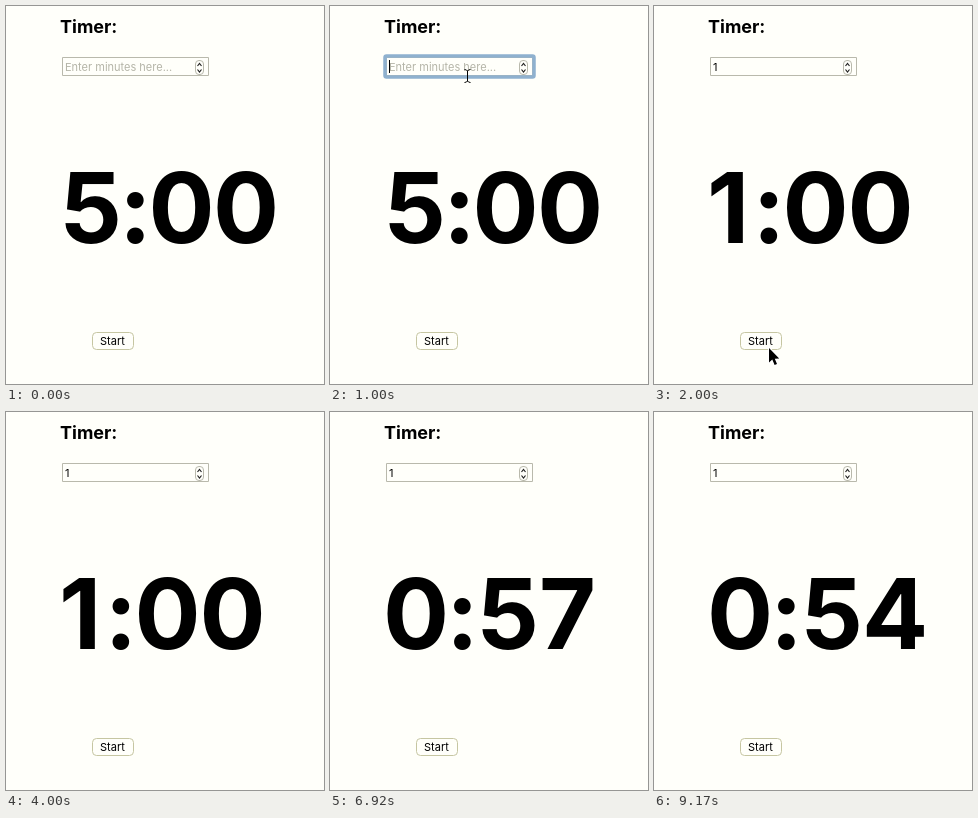
An HTML page with a canvas that plays this animation: 318x378 px, repeating every 9.21 s.

```html
<!DOCTYPE html>
<html lang="en">
<head>
<meta charset="utf-8">
<title>Timer</title>
<style>
  html, body { margin: 0; width: 100%; height: 100%; overflow: hidden; background: #fffffa; }
  canvas { display: block; width: 318px; height: 378px; }
</style>
</head>
<body>
<canvas></canvas>
<script>
const W = 318, H = 378, LOOP = 9210;
const TYPED = 1290, FOCUS = 880, BLUR = 1960, FIRST_TICK = 4040;
const FONT = 'Inter, "Open Sans", sans-serif';
const canvas = document.querySelector('canvas');
const ctx = canvas.getContext('2d');
const dpr = window.devicePixelRatio || 1;
canvas.width = W * dpr;
canvas.height = H * dpr;
ctx.scale(dpr, dpr);

// Pointer stops: time, x, y; equal neighbours are pauses.
const stops = [
  [40, 318, 378], [250, 232, 328], [420, 232, 328], [860, 137, 69],
  [1290, 137, 69], [1420, 170, 97], [1500, 172, 108], [1880, 115, 342],
  [2710, 115, 342], [2711, 119, 346], [2750, 119, 346]
];

function text(str, x, y, size, color = '#000', weight = 400) {
  ctx.font = `${weight} ${size}px ${FONT}`;
  ctx.fillStyle = color;
  ctx.fillText(str, x, y);
}

function box(x, y, w, h, r, color, width = 1) {
  ctx.beginPath();
  ctx.roundRect(x, y, w, h, r);
  ctx.strokeStyle = color;
  ctx.lineWidth = width;
  ctx.stroke();
}

function line(points, color = '#000', width = 1) {
  ctx.beginPath();
  points.forEach(([x, y]) => ctx.lineTo(x, y));
  ctx.strokeStyle = color;
  ctx.lineWidth = width;
  ctx.stroke();
}

function drawClock(t) {
  const ticks = Math.floor((t - FIRST_TICK) / 1000);
  let label = '5:00', lefts = [59, 121, 146.5, 211];
  if (ticks >= 0) {
    label = '0:' + (59 - ticks);
    lefts = [57, 124, 152, 212];
  } else if (t >= TYPED) {
    label = '1:00';
    lefts = [57, 106.5, 132.5, 197.5];
  }
  ctx.font = `700 98px ${FONT}`;
  [...label].forEach((c, i) => {
    const bearing = ctx.measureText(c).actualBoundingBoxLeft;
    text(c, lefts[i] + bearing, 237, 98, '#000', 700);
  });
}

function drawInput(t) {
  const focused = t >= FOCUS && t < BLUR;
  const typed = t >= TYPED;
  box(56.5, 51.5, 146, 18, 0, '#b9b9ac');
  if (focused) {
    ctx.globalAlpha = Math.min(1, (t - FOCUS) / 100);
    box(55, 50, 149, 21, 1.5, '#8fb1cf', 3.5);
    ctx.globalAlpha = 1;
  }
  if (typed) text('1', 59, 65, 11);
  else text('Enter minutes here...', 59, 65, 11, '#b5b5a8');
  if (focused) {
    const x = typed ? 64.5 : 59.5;
    line([[x, 54], [x, 67]]);
  }
  box(189.5, 54.5, 8, 14, 3.5, '#b9b9ac');
  line([[191.5, 60], [193.5, 57.5], [195.5, 60]], '#222', 1.2);
  line([[191.5, 63.5], [193.5, 66], [195.5, 63.5]], '#222', 1.2);
}

function drawArrow() {
  ctx.beginPath();
  [[0, 0], [0, 14.5], [3.3, 11.5], [5.6, 17], [8, 16], [5.8, 10.7], [10.2, 10.5]]
    .forEach(([x, y]) => ctx.lineTo(x, y));
  ctx.closePath();
  ctx.lineJoin = 'round';
  ctx.strokeStyle = '#fff';
  ctx.lineWidth = 2;
  ctx.stroke();
  ctx.fillStyle = '#000';
  ctx.fill();
  ctx.lineJoin = 'miter';
}

function drawBeam() {
  line([[-2.5, -5.5], [-0.5, -5], [0.5, -4], [0.5, 6], [-0.5, 7], [-2.5, 7.5]]);
  line([[3.5, -5.5], [1.5, -5], [0.5, -4], [0.5, 6], [1.5, 7], [3.5, 7.5]]);
}

function drawPointer(t) {
  const i = stops.findIndex(s => s[0] > t);
  if (i < 1) return;
  const [t0, x0, y0] = stops[i - 1], [t1, x1, y1] = stops[i];
  const p = (t - t0) / (t1 - t0), k = p * p * (3 - 2 * p);
  const x = x0 + (x1 - x0) * k, y = y0 + (y1 - y0) * k;
  const overInput = x > 56 && x < 203 && y > 51 && y < 70;
  ctx.save();
  ctx.translate(x, y);
  overInput ? drawBeam() : drawArrow();
  ctx.restore();
}

function draw(t) {
  ctx.fillStyle = '#fffffa';
  ctx.fillRect(0, 0, W, H);
  text('Timer:', 54, 27, 18, '#000', 700);
  drawInput(t);
  drawClock(t);
  box(86.5, 326.5, 41, 17, 4, '#c6c6a2');
  text('Start', 94, 339, 11);
  drawPointer(t);
}

let start;
function frame(now) {
  start ??= now;
  draw((now - start) % LOOP);
  requestAnimationFrame(frame);
}
draw(0);
requestAnimationFrame(frame);
</script>
</body>
</html>
```
